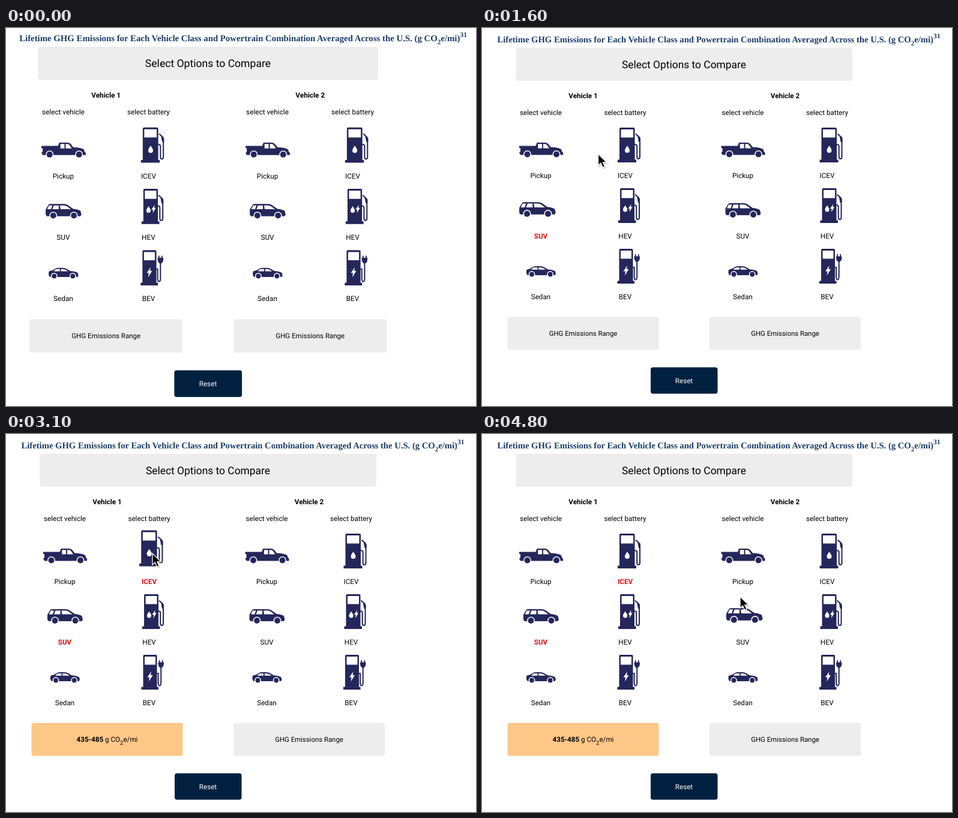
An HTML page for the animation above (4.9 s loop, 783 by 630 pixels).

```html
<!DOCTYPE html>
<html lang="en">
<head>
<meta charset="utf-8">
<title>Vehicle emissions comparison</title>
<style>
  html, body { margin: 0; width: 100%; height: 100%; overflow: hidden; background: #fff; }
  svg { display: block; width: 783px; height: 630px; }
  text { font: 11.65px Roboto, "Noto Sans", sans-serif; text-anchor: middle; text-rendering: geometricPrecision; }
  .title { font: bold 14.67px "Liberation Serif", serif; text-anchor: start; fill: #1d3d68; }
  .small { font-size: 11.4px; }
  .bold, .picked { font-weight: 700; }
  .picked { fill: #e00b10; }
  .icon { fill: #25265a; }
  .hole { fill: #fff; }
  .hose { fill: none; stroke: #25265a; stroke-width: 2; }
</style>
</head>
<body>
<svg id="stage" viewBox="0 0 783 630"></svg>
<script>
const DURATION = 4900, STEP = 100;
const stage = document.getElementById('stage');

const text = (x, y, label, attrs = '') => `<text x="${x}" y="${y}" ${attrs}>${label}</text>`;
const box = (x, y, w, h, fill = '#ededed', attrs = '') =>
  `<rect x="${x}" y="${y}" width="${w}" height="${h}" rx="4" fill="${fill}" ${attrs}/>`;
const wheel = (x, y, r) =>
  `<circle class="hole" cx="${x}" cy="${y}" r="${r + 1.5}"/><circle cx="${x}" cy="${y}" r="${r}"/>`;
const car = (body, windows, wheels) =>
  `<path d="${body}"/><path class="hole" d="${windows}"/>${wheels}`;

const drop = (x, y, s = 1) =>
  `<path class="hole" transform="translate(${x} ${y}) scale(${s})"
    d="M0-6C1.5-3 4-1 4 2A4 4 0 0 1-4 2C-4-1-1.5-3 0-6Z"/>`;
const bolt = (x, y, s = 1) =>
  `<path class="hole" transform="translate(${x} ${y}) scale(${s})"
    d="M2-8L-4.5 1.5H-1L-2 8.5L4.5-2H1Z"/>`;
const nozzle = `<path class="hose" d="M256 176.5L261.5 181.5Q263 183 263 185V214.5
  Q263 218 260.6 218Q258.2 218 258.2 214.5V197Q258.2 194 254 194"/><path d="M259 179.5L264 183.5V190H261Z"/>`;
const plug = `<path class="hose" d="M260 187V212Q260 217.5 257.7 217.5Q255.4 217.5 255.4 212V197H253"/>
  <path d="M256.6 175H258.4V178.5H261.6V175H263.4V178.5H264.7V181Q264.7 185.5 261.5 187.5H258.5
  Q255.3 185.5 255.3 181V178.5H256.6Z"/>`;
const pump = (dx, dy, right, hose, mark) =>
  `<g transform="translate(${dx} ${dy})"><path d="M229 168Q229 166 231 166H${right - 2}Q${right} 166 ${right} 168V219.5
   H${right + 2.5}V224H226V219.5H229Z"/><path class="hole" d="M231.5 169H${right - 2.5}V182.5H231.5Z"/>${hose}${mark}</g>`;

const icons = {
  Pickup: car(
    'M62 196.5H89.5L91.5 191H105.5Q108.5 191 110.5 193.5L114.5 198.5Q130 199 132.5 203L133 206L135 207.5V211.5H64L62 207.5L64 206V200H62Z',
    'M93.3 193.2H100V200.5H93.3ZM102 193.2H105Q107 193.2 108.5 195.2L112 200.5H102Z',
    wheel(75.5, 210.5, 5) + wheel(124, 210.5, 5)),
  SUV: car(
    'M69 301L74 292.8Q75 292 77 292H99Q103 292 106 294L114.5 300Q124 301 126.5 303.5L128 309.5L126 312H71L69 309.5Z',
    'M74.5 294.3H80L77.7 300.5H71.5ZM82.5 294.3H90.5V300.5H80ZM92.5 294.3H99Q102 294.3 104.5 296L110.5 300.5H93.5Z',
    wheel(81.5, 311, 4.9) + wheel(115.5, 311, 4.9)),
  Sedan: car(
    'M74 404Q75 402 80 401.3L85 398.2Q87 397 90 397H97Q101 397 104 399L109.5 402.2Q119.5 403 122 405.5L123 410L121 412H76L74 409Z',
    'M86.5 399H92.5V402.7H82Q84 400.3 86.5 399ZM94.3 399H97Q100.5 399 103 400.8L105.8 402.7H94.3Z',
    wheel(83, 410.5, 3.9) + wheel(113.7, 410.5, 3.9)),
  ICEV: pump(0, 0, 254.5, nozzle, drop(242, 202)),
  HEV: pump(1, 101, 253, `<g transform="translate(-2)">${nozzle}</g>`, drop(237.5, 200, 0.9) + bolt(246, 199, 0.82)),
  BEV: pump(-0.5, 202, 252, `<g transform="translate(-1.3)">${plug}</g>`, bolt(240.5, 202)),
};
const layout = [
  ['Pickup', 98, 249.7], ['SUV', 98, 350.7], ['Sedan', 98, 451.7],
  ['ICEV', 238.5, 249.7], ['HEV', 238.5, 350.7], ['BEV', 238.5, 451.7],
];

const panel = n => `<g transform="translate(${(n - 1) * 336.5})">
  ${text(168.5, 117, 'Vehicle ' + n, 'class="bold"')}
  ${text(98, 144.5, 'select vehicle')}${text(238.5, 144.5, 'select battery')}
  ${layout.map(([name, x, y]) =>
    `<g class="icon" id="${name}${n}">${icons[name]}</g>` + text(x, y, name, `id="label${name}${n}"`)).join('')}
  ${box(42.5, 481.5, 252, 55, '#ededed', `id="range${n}"`)}
  ${text(168.5, 513, 'GHG Emissions Range', `id="empty${n}" class="small"`)}
</g>`;

stage.innerHTML = `<g id="page">
  <text class="title" x="25.5" y="24">Lifetime GHG Emissions for Each Vehicle Class and Powertrain Combination Averaged Across the U.S. (g CO<tspan
    dy="5" font-size="11">2</tspan><tspan dy="-5">e/mi)</tspan><tspan dy="-7" font-size="11.5">31</tspan></text>
  ${box(56.5, 33, 560.5, 55)}
  ${text(336.5, 66.7, 'Select Options to Compare', 'style="font-size:17.4px"')}
  ${panel(1)}${panel(2)}
  ${text(168.5, 513, `<tspan class="bold">435-485</tspan> g CO<tspan dy="5" font-size="9.5">2</tspan><tspan dy="-5">e/mi</tspan>`, 'id="result"')}
  ${box(281, 565.5, 111.5, 44, '#022140')}
  ${text(336.5, 591.7, 'Reset', 'fill="#fff"')}
</g>
<g id="cursor">
  <path d="M0 0V19L4.4 15L7.6 22.3L11 20.8L7.9 13.8H14Z" transform="translate(1 2)" fill="#0003" stroke="#0001" stroke-width="3"/>
  <path d="M0 0V19L4.4 15L7.6 22.3L11 20.8L7.9 13.8H14Z" stroke="#fff" stroke-width="1.3"/>
</g>`;

const el = id => document.getElementById(id);
const clamp = v => Math.max(0, Math.min(1, v));

// time, x, y of the pointer tip
const path = [
  [400, 190, 600], [500, 172, 380], [600, 157, 210], [800, 120, 240], [1000, 98, 300],
  [1400, 98, 300], [1600, 193.5, 210], [1900, 235, 191], [2200, 238.5, 190], [2700, 244, 199],
  [3300, 244, 199], [3600, 275, 300], [3800, 399, 395], [4100, 434, 405], [4400, 432, 335], [4800, 430, 271],
];
// hovered icon: start, end, shift, centre, enlargement
const hovers = [
  { id: 'SUV1', from: 900, to: 1800, dx: -6, dy: -1.5, cx: 98.5, cy: 304.5, grow: 0.03 },
  { id: 'ICEV1', from: 1900, to: 3550, dx: -3.2, dy: -4.5, cx: 245.5, cy: 195, grow: 0.035 },
  { id: 'HEV1', from: 3400, to: 3860, dx: -3.2, dy: -4.5, cx: 244.5, cy: 296, grow: 0.035 },
  { id: 'SUV2', from: 4500, to: 5100, dx: 2.3, dy: -1.5, cx: 98.5, cy: 304.5, grow: 0.03 },
];

function pointerAt(t) {
  const next = path.findIndex(p => p[0] >= t);
  if (next < 1) return path[0].slice(1);
  const [a, b] = [path[next - 1], path[next]];
  const k = (t - a[0]) / (b[0] - a[0]);
  return [a[1] + (b[1] - a[1]) * k, a[2] + (b[2] - a[2]) * k];
}

function render(t) {
  const zoom = clamp(1 - t / 200), zx = 0.0107 * zoom, zy = 0.013 * zoom;
  el('page').setAttribute('transform', `matrix(${1 + zx} 0 0 ${1 + zy} ${-340 * zx} ${-187 * zy})`);

  for (const h of hovers) {
    const k = clamp(Math.min(t - h.from, h.to - t) / 200);
    el(h.id).setAttribute('transform',
      `translate(${h.cx + h.dx * k} ${h.cy + h.dy * k}) scale(${1 + h.grow * k}) translate(${-h.cx} ${-h.cy})`);
  }

  const done = t >= 2700;
  el('labelSUV1').classList.toggle('picked', t >= 1300);
  el('labelICEV1').classList.toggle('picked', done);
  el('range1').setAttribute('fill', done ? '#fdc788' : '#ededed');
  el('empty1').style.display = done ? 'none' : '';
  el('result').style.display = done ? '' : 'none';

  el('cursor').style.display = t < 400 ? 'none' : '';
  el('cursor').setAttribute('transform', `translate(${pointerAt(t).join(' ')})`);
}

const start = performance.now();
function tick() {
  const t = (performance.now() - start) % DURATION;
  render(Math.floor(t / STEP) * STEP);
  requestAnimationFrame(tick);
}
tick();
</script>
</body>
</html>
```
